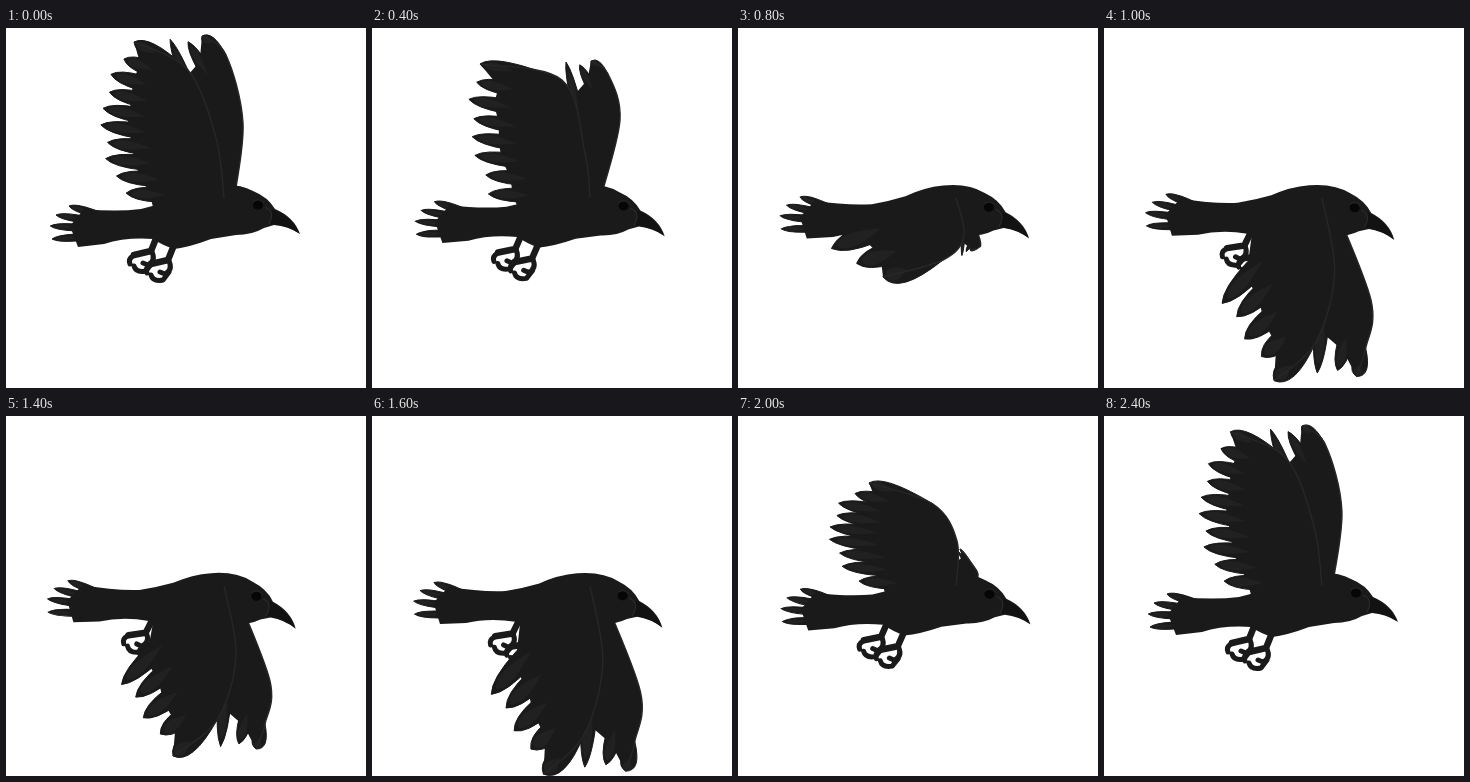
An HTML page that plays this animation: 360 by 360 pixels, repeating every 2.6 s.

```html
<!DOCTYPE html>
<html lang="en">
<head>
<meta charset="utf-8">
<title>Flying crow</title>
<style>
  html, body { margin: 0; width: 100%; height: 100%; overflow: hidden; background: #fff; }
  svg { display: block; width: 100%; height: 100%; }
  .pose { visibility: hidden; animation: show 2600ms step-end infinite; }
  @keyframes show {
    0% { visibility: visible; }
    7.6923%, 100% { visibility: hidden; }
  }
</style>
</head>
<body>
<svg id="stage" viewBox="0 0 360 360">
  <defs>
    <g id="foot" fill="none" stroke="#1a1a1a" stroke-width="5" stroke-linecap="round" stroke-linejoin="round">
      <path d="M151 208L145 223L128 227" stroke-width="6.5"/>
      <path d="M146 224Q150 233 142 237L137 235M127 228Q122 231 124 236M128 238Q130 245 140 243L146 235"/>
    </g>
    <g id="feet">
      <use href="#foot"/>
      <use href="#foot" transform="translate(17 9)"/>
    </g>
    <g id="body">
      <path fill="#1a1a1a" d="M78 181Q110 184 135 181Q152 177 168 171Q186 161 205 158Q230 154 247 163
        Q262 169 269 181Q288 189 294 206Q282 198 268 197L258 200Q246 207 230 207L205 211
        Q184 219 168 221Q156 217 147 211Q120 209 98 216L72 219L64 198Z"/>
      <path fill="#121212" d="M266 181Q286 189 293 205Q281 197 265 196Z"/>
      <path fill="none" stroke="#2d2d2d" d="M259 179Q270 183 263 196"/>
      <ellipse cx="252" cy="177" rx="5" ry="4.5" fill="#060606"/>
      <path fill="none" stroke="#2a2a2a" stroke-width=".8" d="M247 174Q253 169 258 175"/>
    </g>
  </defs>
</svg>
<script>
const STEP = 200, LOOP = 2600, INK = '#1a1a1a';
const NEAR = { shoulder: [218, 170], joint: [150, 190] };
const FAR = { shoulder: [228, 172], joint: [212, 165] };

const points = text => text.split(' ').map(p => p.split(',').map(Number));
const mix = (a, b, t) => a.map((v, i) => v + (b[i] - v) * t);
const mixAll = (a, b, t) => a.map((p, i) => mix(p, b[i], t));
const bend = (a, c, b, t) => mix(mix(a, c, t), mix(c, b, t), t);
const gap = (a, b) => Math.hypot(b[0] - a[0], b[1] - a[1]);
const fmt = p => p.map(v => v.toFixed(1)).join(' ');

// Near wing: two front-edge points, then first tip, bend and last tip of the feather row.
// Far wing: the same without the bend.
const pose = (near, far) => ({ near: points(near), far: points(far) });
const high = pose('210,110 182,42 128,14 70,88 119,165', '237,95 220,27 196,8 166,16');
const raised = pose('213,125 190,52 108,36 86,98 119,166', '248,92 236,46 219,33 195,38');
const half = pose('219,125 195,88 131,67 60,106 120,165', '240,160 234,148 222,133 218,137');
const level = pose('226,208 205,232 145,249 112,238 97,219', '242,212 240,220 232,222 224,226');
const low = pose('230,240 211,304 167,340 138,296 116,268', '264,265 259,308 250,333 215,326');
const folded = pose('205,215 180,228 152,238 98,210 107,173', '236,212 226,219 214,222 206,220');

const blend = (a, b, t) => ({ near: mixAll(a.near, b.near, t), far: mixAll(a.far, b.far, t) });

function curve(pts) {
  let d = 'M' + fmt(pts[0]);
  for (let i = 0; i < pts.length - 1; i++) {
    const p = pts[i], q = pts[i + 1], before = pts[i - 1] || p, after = pts[i + 2] || q;
    const c1 = p.map((v, k) => v + (q[k] - before[k]) / 6);
    const c2 = q.map((v, k) => v - (after[k] - p[k]) / 6);
    d += 'C' + [c1, c2, q].map(fmt).join(' ');
  }
  return d;
}

// Feather that is widest near its tip.
function leaf(root, tip, width) {
  const len = gap(root, tip) || 1, m = mix(root, tip, .84);
  const side = s => fmt([m[0] - s * width * (tip[1] - root[1]) / len, m[1] + s * width * (tip[0] - root[0]) / len]);
  return `M${fmt(root)}Q${side(1)} ${fmt(tip)}Q${side(-1)} ${fmt(root)}Z`;
}

function feathers(tips, roots, width) {
  const all = tips.map((tip, i) => leaf(roots[i], tip, width)).join('');
  const sheen = tips.map((tip, i) => leaf(mix(tip, roots[i], .4), mix(tip, roots[i], .05), width * .6)).join('');
  return `<path d="${all}" fill="${INK}" stroke="${INK}"/><path d="${sheen}" fill="#212121"/>`;
}

function row(first, mid, last, count) {
  return Array.from({ length: count }, (_, i) => bend(first, mid, last, i / (count - 1)));
}

function drawWing(keys, { shoulder, joint }) {
  const [inner, outer, first] = keys, last = keys[keys.length - 1];
  const mid = keys.length > 4 ? keys[3] : mix(first, last, .5);
  const length = gap(first, mid) * .5 + gap(mid, last) * .5;
  const count = Math.max(3, Math.round(length / 9));
  const roots = row(outer, inner, shoulder, count);
  const tips = row(first, mid, last, count).map((tip, i) => mix(tip, roots[i], i ? .03 * Math.sin(i * 2.4) : 0));
  const web = tips.map((tip, i) => mix(tip, roots[i], i ? .24 : 0));
  const front = curve([shoulder, inner, outer, first]);
  const shape = front + web.slice(1).map(p => 'L' + fmt(p)).join('') + `L${fmt(joint)}Z`;
  return `<path d="${shape}" fill="${INK}"/>` + feathers(tips, roots, gap(tips[0], tips[1]) * .75) +
    `<path d="${front}" fill="none" stroke="#272727" stroke-width="1.4"/>`;
}

const tailTips = row([63, 178], [38, 190], [46, 211], 4);
document.getElementById('body').insertAdjacentHTML('afterbegin',
  feathers(tailTips, tailTips.map((_, i) => [112, 192 + i * 5]), 7));

// Wing pose and body tilt for each step; the legs are tucked in while the wings are level.
const flight = [
  [high, 0], [blend(high, raised, .75), .8], [raised, 1.6], [blend(raised, half, .75), 2.5],
  [level, 3.4], [blend(level, low, 1.14), 4.4], [blend(level, low, .97), 4.8], [low, 5],
  [blend(level, low, 1.2), 4.3], [folded, 3.4], [half, 1.8], [blend(half, high, 1.05), .9],
  [blend(high, raised, .08), 0]
];

document.getElementById('stage').insertAdjacentHTML('beforeend', flight.map(([wings, tilt], i) => {
  const part = id => `<use href="#${id}" transform="rotate(${-tilt} 215 160)"/>`.replace('--', '');
  const turned = id => part(id).replace(`rotate(${-tilt}`, `rotate(${tilt}`);
  return `<g class="pose" style="animation-delay:${i ? i * STEP - LOOP : 0}ms">` +
    drawWing(wings.far, FAR) + (wings === level ? '' : turned('feet')) + turned('body') +
    drawWing(wings.near, NEAR) + '</g>';
}).join(''));
</script>
</body>
</html>
```
